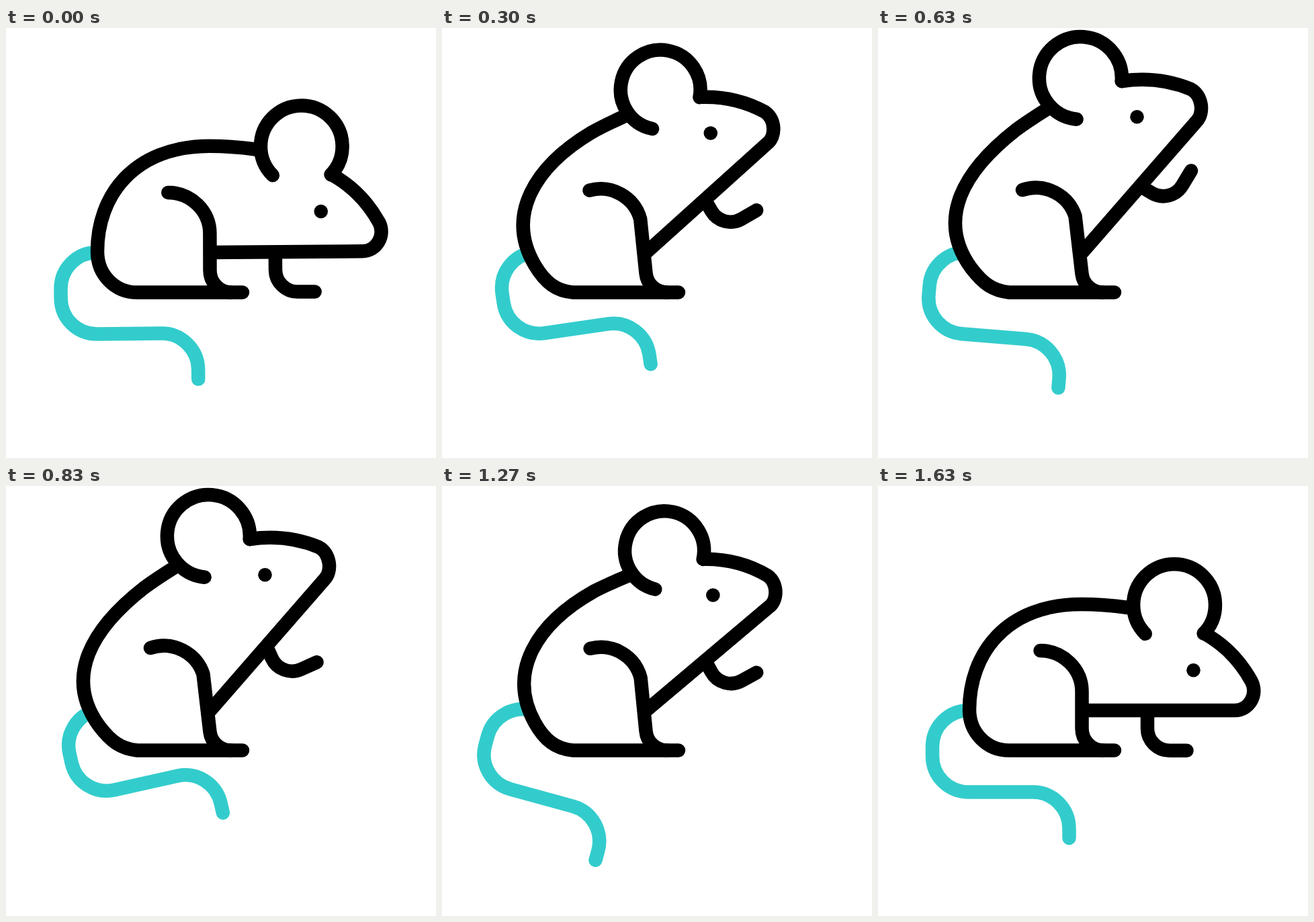
Write an HTML page that moves like this. It is 640 by 640 pixels and loops after 1.67 s.

```html
<!DOCTYPE html>
<html lang="en">
<head>
<meta charset="utf-8">
<title>Mouse</title>
<style>
  html, body { margin: 0; width: 100%; height: 100%; overflow: hidden; background: #fff; }
  svg { display: block; width: 100%; height: 100%; }
  path { fill: none; stroke: #000; stroke-width: 20.5; stroke-linecap: round; stroke-linejoin: round; }
  #tail { stroke: #3cc; }
  #back { fill: #fff; }
</style>
</head>
<body>
<svg viewBox="0 0 640 640">
  <path id="tail" d="M135 334C105 334 81 358 81 388V402C81 432 105 455.5 135 455.5H230.5C260.5 455.5 284.5 480 284.5 510V524"/>
  <path id="back"/>
  <path id="paw" d="M0 8V27C0 45 15 59.7 33 59.7H58.5"/>
  <path id="head"/>
  <path id="thigh"/>
  <path id="ear"/>
  <circle id="eye" r="10.3"/>
</svg>
<script>
const LOOP = 1670, STEP = 100 / 3, LAST = 49;
const $ = id => document.getElementById(id);

// Each outline: crouching pose, sitting pose
const outlines = {
  back: [
    "M372 181C350 178 325 176 303 176C190 176 136 250 136 333C136 367 162 393.5 195 393.5L352 393.5",
    "M252 120.5C236 130.5 220 141 205.5 151.5C128 212 85.5 284 138.5 357C157.5 382 172 391 195 393.5L352 393.5"
  ],
  thigh: [
    "M241.5 245C275 245 303.5 272 303.5 306L303.5 361C303.5 379 318 393.5 335 393.5",
    "M215 241C248 230 283 248 293.5 280L303.5 366C305.5 382 319 393.5 335 393.5"
  ],
  head: [
    "M304 334L531 334C552 334 566 311 556 291C539 260 514 235 485 219",
    "M304 334L474 139C486 126.5 482.5 100 465.5 91C434 78 398 74 363 79"
  ]
};

// Keys: step, value, then the ease handles leading into that key
const rise = [[-1, 0], [15, 1, .4, .38], [33, 1], [49, 0, .43, .52]];
const wag = [[-1, 0], [6, -12.8], [16, 11.3], [24.25, -12.8], [38, 15.3], [49, 0]];
const wave = [[15, 0], [20, -24.5], [26, 14.5], [32, 0]];

const lerp = (a, b, p) => a + (b - a) * p;
const mix = (a, b, p) => a.map((v, i) => lerp(v, b[i], p));

function ease(x, x1 = .42, x2 = .58) {
  let lo = 0, hi = 1, s = .5;
  for (let i = 0; i < 24; i++) {
    s = (lo + hi) / 2;
    const at = 3 * s * (1 - s) ** 2 * x1 + 3 * s * s * (1 - s) * x2 + s ** 3;
    if (at < x) lo = s; else hi = s;
  }
  return s * s * (3 - 2 * s);
}

function valueAt(keys, step) {
  const i = keys.findIndex(k => k[0] >= step);
  if (i < 0) return keys[keys.length - 1][1];
  if (i === 0) return keys[0][1];
  const [from, a] = keys[i - 1], [to, b, x1, x2] = keys[i];
  return lerp(a, b, ease((step - from) / (to - from), x1, x2));
}

function morph([a, b], p) {
  const goal = b.match(/[\d.]+/g);
  let i = 0;
  return a.replace(/[\d.]+/g, n => lerp(+n, +goal[i++], p).toFixed(2));
}

function draw(step) {
  const p = valueAt(rise, step);
  for (const id in outlines) $(id).setAttribute("d", morph(outlines[id], p));

  const from = mix([397.8, 220], [295.6, 135.7], p);
  const to = mix([484.7, 219.6], [362.7, 79.2], p);
  const r = .701 * Math.hypot(to[0] - from[0], to[1] - from[1]);
  $("ear").setAttribute("d", `M${from}A${r} ${r} 0 1 1 ${to}`);

  const [ex, ey] = mix([469.5, 274.2], [385.5, 132.3], p);
  $("eye").setAttribute("cx", ex);
  $("eye").setAttribute("cy", ey);

  const paw = mix([401, 334], [384.7, 231.8], p);
  const turn = -36.5 * p + valueAt(wave, step);
  $("paw").setAttribute("transform", `translate(${paw}) rotate(${turn})`);
  $("tail").setAttribute("transform", `rotate(${valueAt(wag, step)} 134 332)`);
}

// The motion advances in steps of a thirtieth of a second
const start = performance.now();
function tick() {
  const t = (performance.now() - start) % LOOP;
  draw(Math.min(LAST, Math.floor((t + 5) / STEP)));
  requestAnimationFrame(tick);
}
tick();
</script>
</body>
</html>
```
